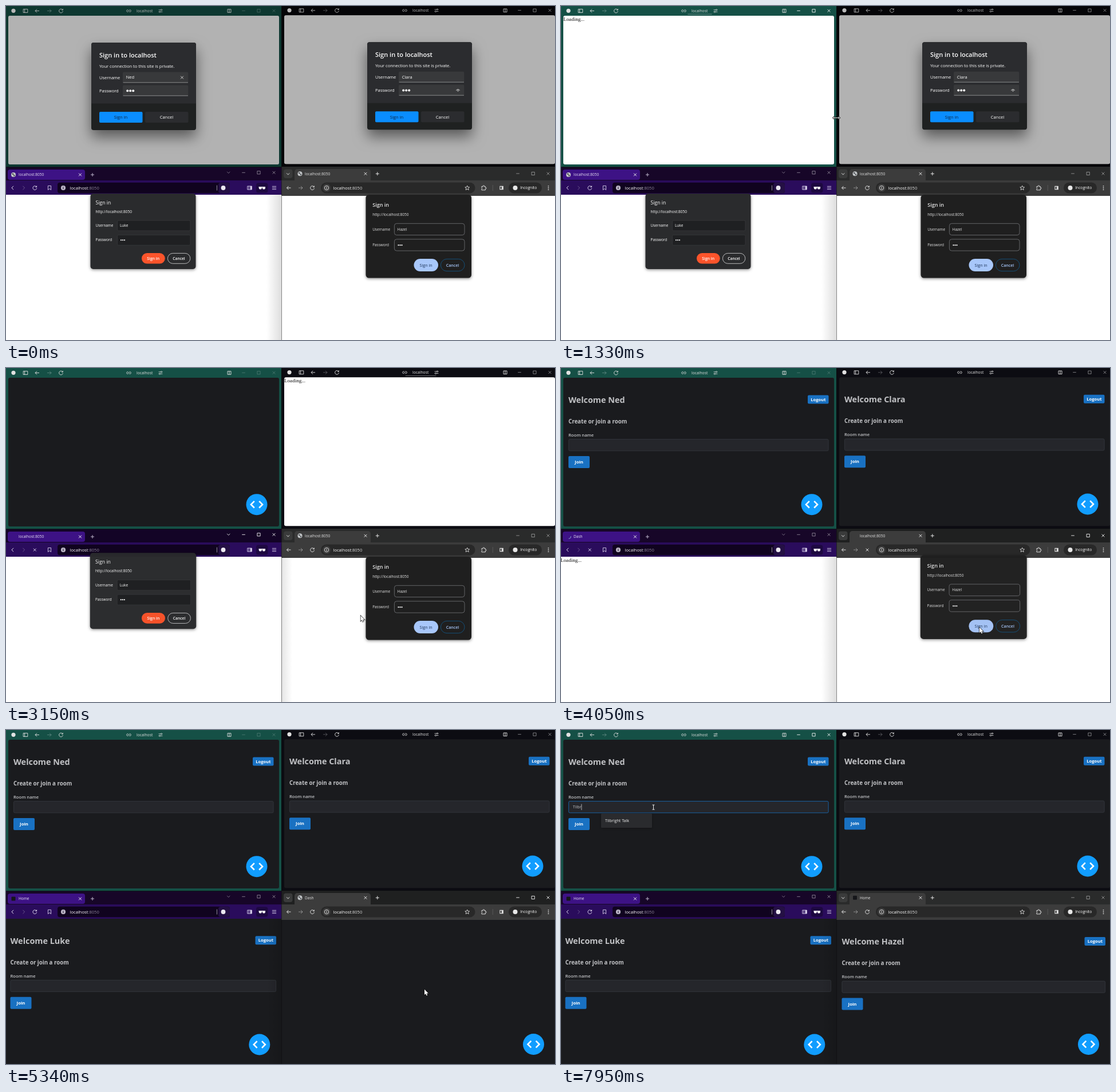
Write an HTML page with a canvas that moves like this. It is 959 px wide and 584 px high and loops after 8 s.

```html
<!DOCTYPE html>
<html lang="en">
<head>
<meta charset="utf-8">
<title>Four browser windows</title>
<style>
html, body { margin: 0; width: 100%; height: 100%; overflow: hidden; background: #0a0a0c; }
canvas { display: block; width: 959px; height: 584px; }
</style>
</head>
<body>
<canvas id="stage"></canvas>
<script>
const W = 959, H = 584, LOOP = 8000;
const canvas = document.getElementById('stage');
const ctx = canvas.getContext('2d');
const ratio = window.devicePixelRatio || 1;
canvas.width = W * ratio;
canvas.height = H * ratio;

const SANS = '"Open Sans", "Noto Sans", sans-serif';
const SERIF = '"Liberation Serif", "Noto Serif", serif';
const BLUE = '#1971c2', DARK = '#1a1b1e';

const ICON = {
  back: 'M3.5 0H-3.5M-.5 -3L-3.5 0L-.5 3',
  forward: 'M-3.5 0H3.5M.5 -3L3.5 0L.5 3',
  reload: 'M3 -1.6A3.4 3.4 0 1 0 3.4 .6M3.3 -3.6V-1.4H1.1',
  cross: 'M-2.4 -2.4L2.4 2.4M2.4 -2.4L-2.4 2.4',
  plus: 'M-3 0H3M0 -3V3',
  min: 'M-2.8 0H2.8',
  max: 'M-2.6 -2.6H2.6V2.6H-2.6Z',
  down: 'M-2.6 -1.2L0 1.4L2.6 -1.2',
  left: 'M1.6 -3.2L-1.6 0L1.6 3.2',
  right: 'M-1.6 -3.2L1.6 0L-1.6 3.2',
  panel: 'M-3.8 -3H3.8V3H-3.8ZM-1.4 -3V3',
  split: 'M-3 -2.8H3V2.8H-3ZM0 -2.8V2.8',
  link: 'M-.8 -1.8H-2A1.8 1.8 0 0 0 -2 1.8H-.8M.8 -1.8H2A1.8 1.8 0 0 1 2 1.8H.8M-1.6 0H1.6',
  tune: 'M-3.4 -1.7H.4M2.6 -1.7H3.4M.4 -1.7a1.1 1.1 0 1 0 2.2 0a1.1 1.1 0 1 0 -2.2 0M-3.4 1.7H-2.6M-.4 1.7H3.4M-2.6 1.7a1.1 1.1 0 1 0 2.2 0a1.1 1.1 0 1 0 -2.2 0',
  bookmark: 'M-2.6 -3.6H2.6V3.6L0 1.4L-2.6 3.6Z',
  menu: 'M-3.6 -2.6H3.6M-3.6 0H3.6M-3.6 2.6H3.6',
  star: 'M0 -3.9L1.1 -1.3L3.9 -1.1L1.8 .8L2.5 3.6L0 2.1L-2.5 3.6L-1.8 .8L-3.9 -1.1L-1.1 -1.3Z',
  puzzle: 'M-3.6 -2.4H-1.2A1.2 1.2 0 1 1 1 -2.4H2.8V-.6A1.2 1.2 0 1 1 2.8 1.6V3.8H-3.6V1.6A1.1 1.1 0 0 0 -3.6 -.5Z',
  eye: 'M-3.4 .3Q0 -3.6 3.4 .3M-1.3 .5a1.3 1.3 0 1 0 2.6 0a1.3 1.3 0 1 0 -2.6 0',
  arrow: 'M0 0V9.6L2.2 7.6L3.6 10.9L5.2 10.2L3.8 7H6.8Z',
  resize: 'M-5.5 0H5.5M-3.5 -2L-5.5 0L-3.5 2M3.5 -2L5.5 0L3.5 2',
  beam: 'M-2 -4H2M0 -4V4M-2 4H2'
};

const clamp = v => Math.max(0, Math.min(1, v));
const ramp = (t, a, b) => clamp((t - a) / (b - a));
const white = a => `rgba(255,255,255,${a})`;
const mix = (a, b, k) => `rgb(${a.map((v, i) => Math.round(v + (b[i] - v) * k))})`;
const pick = (t, steps) => steps.filter(s => t >= s[0]).pop()[1];

function rect(x, y, r, b, fill, rad = 0, line) {
  ctx.beginPath();
  ctx.roundRect(x, y, r - x, b - y, rad);
  if (fill) { ctx.fillStyle = fill; ctx.fill(); }
  if (line) { ctx.strokeStyle = line; ctx.lineWidth = 0.8; ctx.stroke(); }
}

function dot(x, y, r, fill) {
  ctx.beginPath();
  ctx.arc(x, y, r, 0, Math.PI * 2);
  ctx.fillStyle = fill;
  ctx.fill();
}

function icon(name, x, y, color = '#ddd', width = 0.9, fill) {
  const path = new Path2D(ICON[name]);
  ctx.save();
  ctx.translate(x, y);
  ctx.strokeStyle = color;
  ctx.lineWidth = width;
  ctx.stroke(path);
  if (fill) { ctx.fillStyle = fill; ctx.fill(path); }
  ctx.restore();
}

// y is the middle of the lowercase letters
function text(str, x, y, size, color = '#fff', weight = 400, align = 'left', family = SANS) {
  ctx.font = `${weight} ${size}px ${family}`;
  ctx.fillStyle = color;
  ctx.textAlign = align;
  ctx.fillText(str, x, y + size * 0.33);
  return ctx.measureText(str).width;
}

function shadowed(blur, dy, alpha, draw) {
  ctx.save();
  ctx.shadowColor = `rgba(0,0,0,${alpha})`;
  ctx.shadowBlur = blur * ratio;
  ctx.shadowOffsetY = dy * ratio;
  draw();
  ctx.restore();
}

function dots(x, y, gap, r) {
  for (let i = 0; i < 3; i++) dot(x + i * gap, y, r, '#fff');
}

function globe(x, y) {
  dot(x, y, 4, '#c4c7c9');
  ctx.fillStyle = '#45484c';
  ctx.beginPath();
  ctx.ellipse(x - 1, y - 1.2, 1.9, 1.1, 0.5, 0, 7);
  ctx.ellipse(x + 1.3, y + 1.5, 1.5, 1, -0.5, 0, 7);
  ctx.fill();
}

function info(x, y, fill, line, mark) {
  dot(x, y, 3.9, fill);
  ctx.beginPath();
  ctx.arc(x, y, 3.7, 0, 7);
  ctx.strokeStyle = line;
  ctx.lineWidth = 0.9;
  ctx.stroke();
  rect(x - 0.5, y - 0.5, x + 0.5, y + 2, mark);
  rect(x - 0.5, y - 2, x + 0.5, y - 1.1, mark);
}

function controls(xs, y, alpha) {
  ['min', 'max', 'cross'].forEach((n, i) => icon(n, xs[i], y, white(alpha), 0.9));
}

function devButton(x, y) {
  dot(x, y, 18.5, '#119dff');
  ctx.lineJoin = 'miter';
  ctx.strokeStyle = '#fff';
  ctx.lineWidth = 2.6;
  for (const s of [-1, 1]) {
    ctx.beginPath();
    ctx.moveTo(x + s * 4.2, y - 5.8);
    ctx.lineTo(x + s * 10, y);
    ctx.lineTo(x + s * 4.2, y + 5.8);
    ctx.stroke();
  }
}

// Room form; field carries the input's border colour and value
function form(x, r, dy, name, field = {}) {
  ctx.save();
  ctx.translate(0, dy);
  text('Welcome ' + name, x, 56, 14.4, '#c1c2c5', 700);
  rect(r - 36.5, 47.5, r, 62.5, BLUE, 2);
  text('Logout', r - 18.2, 55, 7.6, '#fff', 700, 'center');
  text('Create or join a room', x, 93.5, 9.7, '#c1c2c5', 700);
  text('Room name', x, 117.3, 7.6, '#c1c2c5', 600);
  rect(x + 0.4, 124.6, r - 0.4, 144.8, '#25262b', 2, field.line || '#373a40');
  rect(x, 154, x + 37, 175, BLUE, 2);
  text('Join', x + 18.5, 164.5, 7.8, '#fff', 700, 'center');
  const w = field.value ? text(field.value, x + 7.7, 134.6, 7.2, '#c1c2c5') : 0;
  if (field.caret) rect(x + 7.6 + w, 129.5, x + 8.3 + w, 140, '#e4e5e7');
  ctx.restore();
}

function page(t, s) {
  if (t >= s.dark) rect(...s.box, DARK, s.rad);
  else rect(...s.box, '#fff', s.rad);
  if (t >= s.loading && t < s.button) text('Loading...', s.loadAt[0], s.loadAt[1], 9.1, '#111', 400, 'left', SERIF);
  if (t >= s.content) form(s.x, s.r, s.dy, s.name, s.field);
  if (t >= s.button) devButton(...s.dev);
}

function topDialog(user, clearable) {
  shadowed(24, 12, 0.5, () => rect(149, 64, 332, 217, '#1f2121', 4));
  rect(149, 64, 332, 170.5, '#2b2c2f', [4, 4, 0, 0]);
  text('Sign in to localhost', 163, 86.5, 11, '#fff', 600);
  text('Your connection to this site is private.', 163, 105.5, 7.55);
  text('Username', 163, 125.3, 7.5);
  text('Password', 163, 148.3, 7.5);
  for (const y of [115.5, 138.5]) {
    rect(204, y, 318.3, y + 18.7, '#38393b', 2);
    rect(204.5, y + 18, 318, y + 18.8, '#a5a6a8');
  }
  text(user, 209.7, 125, 7.5);
  dots(212.2, 148.3, 5, 2);
  if (clearable) icon('cross', 307.5, 125, '#ddd', 0.9);
  else icon('eye', 307.5, 148, '#ccc', 0.9);
  rect(163, 185, 238.5, 204, '#0a8dff', 2);
  text('Sign in', 200.5, 194.7, 7.6, '#10243a', 400, 'center');
  rect(243, 185, 318.5, 204, '#2b2c2f', 2);
  text('Cancel', 280.5, 194.7, 7.6, '#fff', 400, 'center');
}

// Top windows share one layout; w.dim is 1 while the sign-in box is open
function topWindow(t, w) {
  const open = 1 - ramp(t, w.click, w.click + 130);
  ctx.save();
  ctx.translate(w.left, w.top);
  rect(0, w.left ? 1 : 0, 481, 281.3, mix(w.frame, w.frameDim, open));
  const ink = mix([225, 225, 225], [185, 185, 185], open);
  dot(13, 8.3, 3.6, ink);
  icon('panel', 34, 8.5, ink);
  icon('back', 54.5, 8.5, ink);
  icon('forward', 75.5, 8.5, white(0.3));
  icon('reload', 96, 8.5, ink);
  icon('link', 214.5, 8.5, ink, 0.8);
  text('localhost', 228, 8.5, 6.75, ink);
  icon('tune', 270, 8.5, ink, 0.8);
  icon('split', 390, 8.5, ink);
  controls([415, 441.5, 468], 8.3, w.focus ? 0.95 : w.idle);
  if (t >= w.loading && t < w.dark) {
    const half = 20.5 + 6.5 * ramp(t, w.loading, w.loading + 500);
    rect(242.5 - half, 13.8, 242.5 + half, 14.7, white(0.35), 0.4);
  }
  page(t, w);
  if (open > 0) {
    ctx.globalAlpha = open;
    rect(...w.box, 'rgba(0,0,0,.3)', w.rad);
    topDialog(w.user, w.clearable);
  }
  ctx.restore();
}

// Closing boxes rise, grow a little and fade
function closing(p, lift, cx, cy, draw) {
  if (p >= 1) return;
  ctx.save();
  const k = 1 + p * 0.025;
  ctx.globalAlpha = 1 - p ** 3;
  ctx.translate(cx, cy - lift * p);
  ctx.scale(k, k);
  ctx.translate(-cx, -cy);
  draw();
  ctx.restore();
}

function favicon(t, x, y, s) {
  if (t < s.start || (t >= s.globe && t < s.home)) globe(x, y);
  else if (t >= s.home) { rect(x - 3.5, y - 3.5, x + 3.5, y + 3.5, '#15161a', 1); }
  else if (t >= s.spin) {
    const a = t / 130;
    ctx.beginPath();
    ctx.arc(x + 1, y, 3.2, a, a + 2);
    ctx.strokeStyle = '#8fb0d8';
    ctx.lineWidth = 1;
    ctx.stroke();
  }
}

function purpleWindow(t, focus, cur) {
  page(t, {
    box: [0, 329, 481, 584], loadAt: [-1, 335.5], loading: 3600, button: 4250, dark: 4320,
    content: 4600, x: 7.5, r: 472, dy: 312.8, name: 'Luke', dev: [442.8, 550]
  });
  rect(0, 282, 481, 306, focus ? '#130426' : '#170628');
  rect(0, 305, 481, 330, '#2a0c5c');
  rect(3, 286, 138, 304, '#3d1285', 4);
  favicon(t, 13, 295, { start: 3150, spin: 3600, globe: 1e9, home: 4600 });
  const title = pick(t, [[0, 'localhost:8050'], [3600, 'Dash'], [4600, 'Updating...'], [4950, 'Home']]);
  text(title, 22, 295, 6.55, '#e8e2f4');
  icon('cross', 129.5, 295, '#eee', 1);
  icon('plus', 151, 295, '#cfc8dc');
  icon('down', 388.7, 291, white(focus ? 0.9 : 0.45));
  controls([415, 441.5, 468], 291.3, focus ? 0.95 : 0.5);
  icon('left', 11.5, 318, '#e2dcf0', 1);
  icon('right', 31, 318, white(0.3), 1);
  icon(t >= 3150 && t < 4400 ? 'cross' : 'reload', 50.3, 318, '#d8d0ea', 1);
  icon('bookmark', 76, 318, '#d8d0ea');
  rect(90, 308.7, 391, 327.3, '#10031f', 4);
  info(100, 318, '#b9b3c4', '#b9b3c4', '#10031f');
  const w = text('localhost', 111.6, 318.2, 7.6, '#fff');
  text(':8050', 111.6 + w, 318.2, 7.6, '#8d8499');
  rect(368, 313.5, 368.8, 322.5, '#b8b2c4');
  rect(371, 309, 391, 327, '#241044', 4);
  dot(379.5, 318, 3.9, '#ece9f0');
  icon('panel', 425.5, 318, '#d8d0ea');
  rect(426.5, 315, 429.3, 321, '#d8d0ea');
  rect(437, 309.5, 457.5, 326.5, '#1d0840', 4);
  rect(441.5, 316, 453, 317.2, '#fff');
  rect(441.8, 316, 446.8, 320.4, '#fff', [0, 0, 2, 2]);
  rect(447.9, 316, 452.9, 320.4, '#fff', [0, 0, 2, 2]);
  icon('menu', 468.5, 318, '#d8d0ea');

  closing(ramp(t, 3090, 3290), 14, 239.5, 394, () => {
    shadowed(5, 1.5, 0.45, () => rect(147.5, 328, 331.5, 460, '#2a2b2d', 5));
    text('Sign in', 156.6, 343.8, 8.6);
    text('http://localhost:8050', 156.6, 359.6, 6.55);
    text('Username', 156.6, 384, 6.35);
    text('Password', 156.6, 409, 6.35);
    rect(194.5, 375, 322, 393, '#1f2022', 2, '#38393c');
    rect(194.5, 400.3, 322, 418.3, '#1f2022', 2, '#38393c');
    text('Luke', 199, 384, 6.5);
    dots(201, 409.3, 3, 1.1);
    rect(237, 432, 277.7, 450.6, '#fb542b', 9.3);
    text('Sign in', 257.2, 441.3, 6.8, '#fff', 600, 'center');
    const hover = cur && cur[0] > 282 && cur[0] < 322 && cur[1] > 432 && cur[1] < 451;
    const c = hover ? '#f0653f' : '#dcdcde';
    rect(282.4, 432.4, 321.8, 450.3, null, 9, c);
    text('Cancel', 302, 441.3, 6.7, hover ? c : '#fff', 600, 'center');
  });
}

function grayWindow(t, focus) {
  page(t, {
    box: [481.5, 331, 959, 584], loadAt: [482, 337], loading: 4400, button: 5140, dark: 5340,
    content: 5530, x: 490.5, r: 951, dy: 314.5, name: 'Hazel', dev: [921.5, 549.5]
  });
  rect(481.5, 281, 959, 306, focus ? '#1f2020' : '#2a2b2b');
  rect(481.5, 305, 959, 332, '#3c3c3c');
  rect(485, 285.5, 500.5, 301, '#3a3b3b', 4);
  icon('down', 492.7, 293.5, '#e3e3e3', 1);
  rect(504, 285, 637, 306, '#3c3c3c', [5, 5, 0, 0]);
  favicon(t, 513.5, 293.3, { start: 3990, spin: 4400, globe: 4860, home: 5600 });
  const title = pick(t, [[0, 'localhost:8050'], [4400, 'Dash'], [5530, 'Updating...'], [5870, 'Home']]);
  text(title, 522, 293.6, 6.55, '#e3e3e3');
  icon('cross', 628, 293.3, '#e3e3e3', 1);
  icon('plus', 648.8, 293.3, '#e3e3e3', 1);
  controls([894, 920.7, 947], 293, focus ? 0.95 : 0.5);
  icon('back', 494, 318, '#e3e3e3', 1);
  icon('forward', 514.5, 318, white(0.4), 1);
  icon(t >= 3990 && t < 4860 ? 'cross' : 'reload', 535, 318, '#dcdcdc', 1);
  rect(550, 308.5, 819.5, 327.5, '#282828', 9.5);
  dot(560, 318, 7, '#3c3c3c');
  info(560, 318, '#3c3c3c', '#e3e3e3', '#e3e3e3');
  const w = text('localhost', 571.6, 318.2, 7.5, '#fff');
  text(':8050', 571.6 + w, 318.2, 7.5, '#dcdcdc');
  icon('star', 805.7, 318, '#dcdcdc');
  icon('puzzle', 834.5, 318, '#dcdcdc', 1);
  rect(849.8, 313, 850.6, 323, '#606060');
  icon('max', 865.5, 318, '#dcdcdc', 1.1);
  rect(865.8, 315, 868.6, 321, '#dcdcdc');
  rect(878, 308.5, 936, 327.5, '#282828', 9.5);
  dot(889.5, 318, 4, '#e8e8e8');
  text('Incognito', 898.2, 318.2, 6.7, '#fff');
  for (const y of [314.8, 318, 321.2]) dot(947.5, y, 0.9, '#dcdcdc');

  closing(ramp(t, 3990, 4190), 7, 720.8, 403, () => {
    shadowed(5, 1.5, 0.45, () => rect(628.5, 330, 813, 475.5, '#1f1f1f', 5.5));
    text('Sign in', 640.2, 348.5, 9, '#e8e8e8', 600);
    text('http://localhost:8050', 640.2, 365, 6.55, '#e3e3e3');
    text('Username', 640.2, 390.5, 6.4, '#e3e3e3');
    text('Password', 640.2, 418, 6.4, '#e3e3e3');
    rect(678.4, 380.3, 801, 400.5, null, 4, '#75777a');
    rect(678.4, 407.8, 801, 428, null, 4, '#75777a');
    text('Hazel', 683.6, 390.5, 6.5, '#e8e8e8');
    dots(685.5, 418.2, 3, 1.1);
    rect(712.5, 442, 755, 464, '#a8c7fa', 11);
    text('Sign in', 733.6, 453.2, 7.2, '#1b3358', 400, 'center');
    rect(759.4, 442.4, 801, 463.6, null, 10.6, '#125a8c');
    text('Cancel', 780, 453.2, 7.1, '#a8c7fa', 600, 'center');
  });
}

// Shade that the window in front throws on its neighbour
function edgeShade(x, to, alpha) {
  const g = ctx.createLinearGradient(x, 0, to, 0);
  g.addColorStop(0, `rgba(0,0,0,${alpha})`);
  g.addColorStop(1, 'rgba(0,0,0,0)');
  rect(Math.min(x, to), 330, Math.max(x, to), 584, g);
}

const PATH = [
  [70, 865, 553], [480, 610, 380], [860, 282, 193], [930, 245, 193], [990, 216, 193], [1140, 216, 193],
  [1330, 481, 195.5], [1380, 481, 195.5], [1580, 610, 300], [1880, 690, 194], [2010, 690, 194],
  [2550, 289.5, 435], [2620, 280, 436], [2690, 257, 440], [2830, 257, 440], [2980, 480, 438],
  [3150, 619.5, 433], [3200, 619.5, 433], [3850, 731, 453.5], [6010, 731, 453.5],
  [6220, 165, 104], [6480, 165, 104], [6550, 161.5, 135]
];

function cursorAt(t) {
  if (t < PATH[0][0]) return null;
  const i = PATH.findIndex(p => p[0] > t);
  if (i < 0) return PATH[PATH.length - 1].slice(1);
  const [a, b] = [PATH[i - 1], PATH[i]];
  const k = ramp(t, a[0], b[0]);
  return [a[1] + (b[1] - a[1]) * k, a[2] + (b[2] - a[2]) * k];
}

function drawCursor(t, c) {
  if (!c) return;
  const edge = c[1] < 280 && Math.abs(c[0] - 481) < 4;
  if (edge || t >= 6550) {
    const name = edge ? 'resize' : 'beam';
    if (edge) icon(name, c[0], c[1], '#000', 2.2);
    icon(name, c[0], c[1], '#fff', 0.9);
  } else icon('arrow', c[0], c[1], '#111', 1.3, '#fff');
}

function draw(t) {
  ctx.setTransform(ratio, 0, 0, ratio, 0, 0);
  rect(0, 0, W, H, '#08080b');
  const focus = pick(t, [[0, ''], [860, 'green'], [1950, 'black'], [2760, 'purple'], [3990, 'gray'], [6750, 'green']]);
  const cur = cursorAt(t);
  const typed = pick(t, [[0, 0], [7490, 1], [7690, 2], [7750, 3], [7810, 4], [7950, 5]]);

  const shared = { box: [4, 17, 477, 277], rad: 3, loadAt: [4, 22.5], x: 13, r: 467.5, dy: 0, dev: [438, 238.7] };
  topWindow(t, {
    ...shared, left: 0, top: 0, frame: [21, 80, 70], frameDim: [14, 56, 49], idle: 0.22,
    focus: focus === 'green', click: 1140, loading: 1270, button: 2690, dark: 2760, content: 3290,
    user: 'Ned', name: 'Ned', clearable: true,
    field: {
      line: mix([55, 58, 64], [25, 113, 194], ramp(t, 6750, 6890)),
      value: 'Tilbr'.slice(0, typed),
      caret: (t >= 6820 && t < 7350) || t >= 7490
    }
  });
  topWindow(t, {
    ...shared, left: 482, top: -0.7, frame: [12, 12, 18], frameDim: [5, 5, 8], idle: 0.5,
    focus: focus === 'black', click: 1950, loading: 2100, button: 3290, dark: 3360, content: 3700,
    user: 'Clara', name: 'Clara'
  });
  if (typed) {
    shadowed(4, 1, 0.35, () => rect(70, 146, 159, 171, '#2a2b2e', 1.5));
    text('Tilbright Talk', 77, 158.5, 7.1, '#f0f0f0');
  }
  purpleWindow(t, focus === 'purple', cur);
  grayWindow(t, focus === 'gray');
  if (focus === 'purple') edgeShade(481.5, 500, 0.1);
  else edgeShade(481, 455, 0.13);
  drawCursor(t, cur);
}

const start = performance.now();
function tick() {
  draw((performance.now() - start) % LOOP);
  requestAnimationFrame(tick);
}
tick();
</script>
</body>
</html>
```
